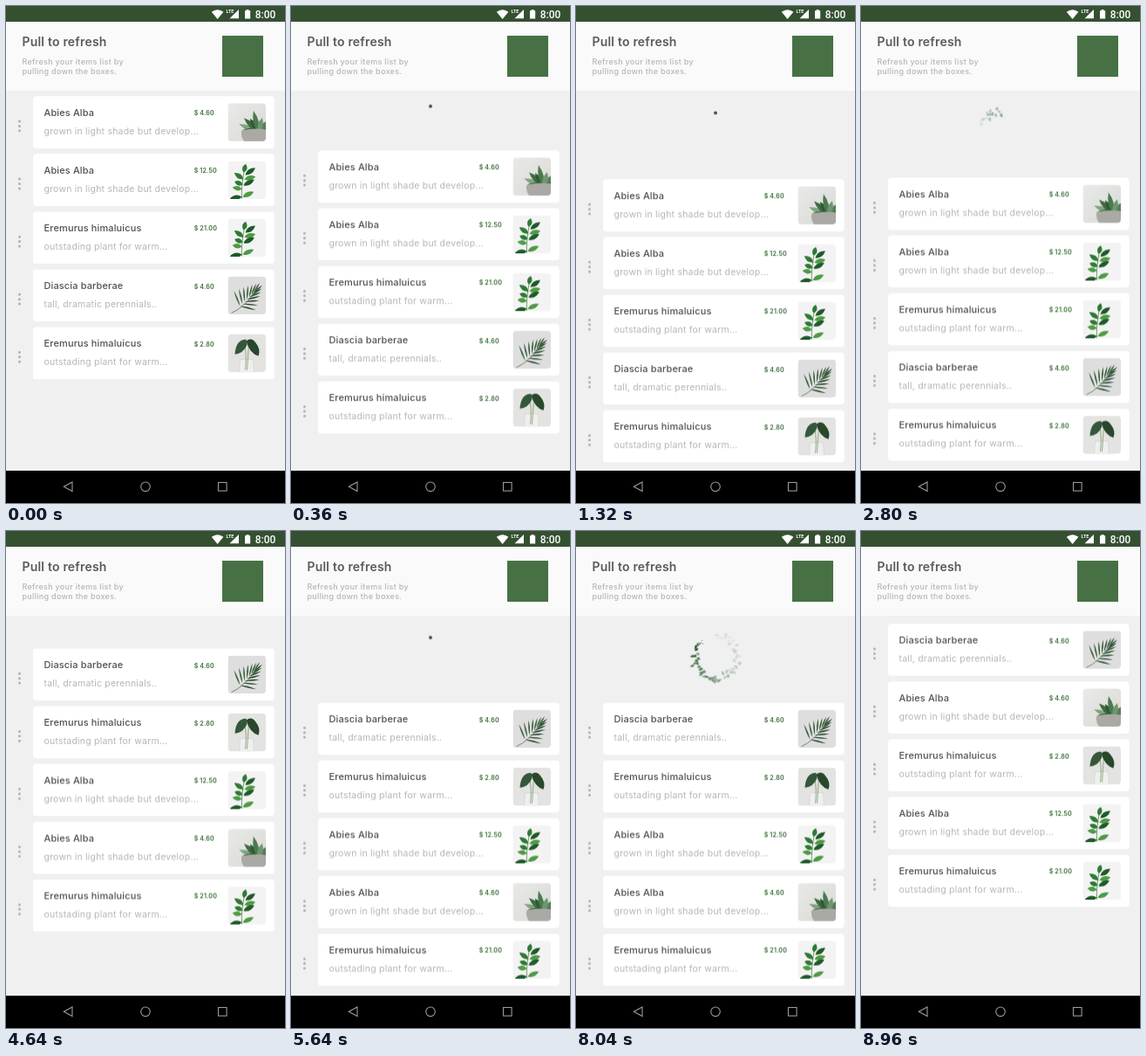
Write an HTML page that moves like this. It is 320 px wide and 569 px high and loops after 9 s.

```html
<!DOCTYPE html>
<html lang="en">
<head>
<meta charset="utf-8">
<title>Pull to refresh</title>
<style>
  html, body { margin: 0; width: 100%; height: 100%; overflow: hidden; background: #f0f0f0; }
  svg { display: block; width: 100vw; height: 100vh; }
  text { font-family: Inter, "Open Sans", sans-serif; }

  .title { font-size: 14px; font-weight: 600; letter-spacing: .2px; fill: #5a5a5a; }
  .sub { font-size: 9px; font-weight: 500; letter-spacing: .3px; fill: #b6b6b6; }
  .name { font-size: 11px; font-weight: 500; letter-spacing: .12px; fill: #505050; }
  .desc { font-size: 10.5px; letter-spacing: .2px; fill: #b4b6b8; }
  .price { font-size: 7px; font-weight: 700; letter-spacing: .15px; fill: #4b7a47; }
  .clock { font: 500 12px Roboto, sans-serif; fill: #fff; }
  .lte { font: 700 5.5px Roboto, sans-serif; fill: #fff; }

  .list { --k: 1; animation: pull 9s infinite; }
  .dot { --k: .23; animation: pull 9s infinite, dot 9s linear infinite; }
  .card { animation: order 9s linear infinite; }
  .leaf { animation: grow 9s linear infinite, fade 9s linear infinite; }

  @keyframes pull {
    0%, 1.78% { transform: translateY(0); animation-timing-function: cubic-bezier(.35, .1, .4, 1); }
    8.44% { transform: translateY(calc(var(--k) * 154px)); animation-timing-function: linear; }
    10.89% { transform: translateY(calc(var(--k) * 156px)); animation-timing-function: cubic-bezier(.25, .46, .45, .94); }
    15.33% { transform: translateY(calc(var(--k) * 93.4px)); }
    48.87% { transform: translateY(calc(var(--k) * 93.4px)); animation-timing-function: cubic-bezier(.455, .03, .515, .955); }
    53.47% { transform: translateY(0); }
    58% { transform: translateY(0); animation-timing-function: ease-in-out; }
    60.22% { transform: translateY(calc(var(--k) * 128px)); animation-timing-function: ease-out; }
    62.44% { transform: translateY(calc(var(--k) * 93.4px)); }
    95.55% { transform: translateY(calc(var(--k) * 93.4px)); animation-timing-function: cubic-bezier(.455, .03, .515, .955); }
    100% { transform: translateY(calc(var(--k) * .9px)); }
  }
  @keyframes dot {
    0%, 2.2% { opacity: 0; }
    3.2%, 16.2% { opacity: 1; }
    16.4%, 58.5% { opacity: 0; }
    59.2%, 63% { opacity: 1; }
    63.1%, 100% { opacity: 0; }
  }
  @keyframes order {
    0%, 48.87% { transform: translateY(var(--a)); }
    48.88%, 95.55% { transform: translateY(var(--b)); }
    95.56%, 100% { transform: translateY(var(--c)); }
  }
  @keyframes grow {
    0% { transform: scale(0); }
    1%, 20% { transform: scale(1); }
    20.1%, 100% { transform: scale(0); }
  }
  @keyframes fade {
    0% { opacity: 1; }
    2.9%, 50% { opacity: 0; }
    50.1%, 100% { opacity: 1; }
  }
</style>
</head>
<body>
<svg viewBox="0 0 320 569" preserveAspectRatio="none">
  <defs>
    <clipPath id="frame"><rect width="43.5" height="43.5" rx="4"/></clipPath>
    <linearGradient id="wall" x2="1" y2="1">
      <stop stop-color="#e9e9e7"/><stop offset="1" stop-color="#d9d9d6"/>
    </linearGradient>
  </defs>
  <rect width="320" height="569" fill="#f0f0f0"/>
  <circle class="dot" cx="160" cy="100.6" r="2" fill="#4b5552"/>
  <g id="loader"></g>
  <g id="list" class="list"></g>

  <rect y="18" width="320" height="79" fill="#fafafa"/>
  <text class="title" x="18.5" y="46">Pull to refresh</text>
  <text class="sub" x="18.5" y="67">Refresh your items list by</text>
  <text class="sub" x="18.5" y="78.3">pulling down the boxes.</text>
  <rect x="248" y="34" width="47" height="47" fill="#477145"/>

  <rect width="320" height="18" fill="#345031"/>
  <g fill="#fff">
    <path d="M242.6 15L235.8 6.8Q242.6 1.8 249.4 6.8Z"/>
    <path d="M267 4V14.3H256.5Z"/>
    <path d="M274 5.2h1.8V4h2.6v1.2h1.8v9.4H274Z"/>
  </g>
  <text class="lte" x="252.5" y="8.4" stroke="#345031" stroke-width="1" paint-order="stroke">LTE</text>
  <text class="clock" x="285.7" y="14">8:00</text>

  <rect y="532" width="320" height="37" fill="#000"/>
  <g fill="none" stroke="#9a9a9a" stroke-width="1.1">
    <path d="M66.3 550.3L76 545V555.6Z"/>
    <circle cx="160" cy="550.3" r="5.3"/>
    <rect x="243.5" y="545.5" width="9.6" height="9.6"/>
  </g>
</svg>
<script>
  const PITCH = 66.1, RUN = 1320, LOOP = 9000;

  let seed = 7;
  const rnd = () => (seed = (seed * 16807) % 2147483647) / 2147483647;
  const pick = list => list[Math.floor(rnd() * list.length)];

  const blade = (x, y, deg, len, w, fill, attrs = "") =>
    `<g transform="translate(${x} ${y}) rotate(${deg})"><path ${attrs} fill="${fill}"
      d="M0 0Q${len * .45} ${-w} ${len} 0Q${len * .45} ${w} 0 0"/></g>`;
  const stroke = (d, color, w) => `<path d="${d}" fill="none" stroke="${color}" stroke-width="${w}"/>`;
  const photo = (fill, body) => `<rect width="44" height="44" fill="${fill}"/>${body}`;

  function succulent() {
    const leaves = [[-158, 24, "#7fa37f"], [-136, 23, "#3f6a42"], [-25, 14, "#3f6b45"], [-48, 18, "#587f5a"],
      [-122, 18, "#2f5a37"], [-103, 25, "#4a7a4e"], [-172, 18, "#35603b"], [-75, 17, "#6d9770"]];
    return photo("url(#wall)",
      leaves.map(([deg, len, c]) => blade(35, 33, deg, len, 6, c)).join("") +
      `<path d="M16 31Q31 28 44 30V44H19Q14 38 16 31Z" fill="#aaa9a5"/>`);
  }

  function bush() {
    const leaves = [[18, 13, -75, 10], [20, 16, -35, 14], [19, 21, -14, 13], [18, 21, -145, 13],
      [18, 28, -28, 14], [16, 32, -172, 11], [17, 27, -160, 10], [16, 41, 172, 14], [17, 41, -24, 14]];
    const greens = ["#2f7a35", "#1f5a2a", "#4f9a45"];
    return photo("#f3f3f3",
      stroke("M16 43Q15 30 19 10", "#4c8a45", .8) +
      leaves.map(([x, y, deg, len], i) => blade(x, y, deg, len, 5.5, greens[i % 3])).join(""));
  }

  function palm() {
    let body = stroke("M4 42Q18 36 32 17", "#4a5f48", .7);
    for (let i = 0; i < 7; i++) {
      const x = 14 + i * 2.6, y = 34 - i * 2.6, len = 19 - i;
      body += blade(x, y, -112 + i * 9, len, 1.8, "#3f6240");
      body += blade(x, y, 14 - i * 9, len, 1.8, "#2f5134");
    }
    return photo("#dedede", body);
  }

  function hearts() {
    return photo("#e3e3e1",
      `<path d="M14 29h15l1 15H13Z" fill="#efefee" stroke="#cfcfcd" stroke-width=".6"/>` +
      stroke("M19 12Q22 24 20 41M24 12Q23 26 22 41", "#7d9a6c", .8) +
      `<path d="M21 6Q9 6 8 23Q18 22 22 12Z" fill="#34573a"/>
       <path d="M21 8Q27 3 32 10Q38 17 35 25Q25 22 21 8Z" fill="#28472b"/>`);
  }

  const light = "grown in light shade but develop...", warm = "outstading plant for warm...";
  // name, text, price, picture, slots before and after each refresh
  const items = [
    ["Abies Alba", light, "4.60", succulent, [0, 3, 1]],
    ["Abies Alba", light, "12.50", bush, [1, 2, 3]],
    ["Eremurus himaluicus", warm, "21.00", bush, [2, 4, 4]],
    ["Diascia barberae", "tall, dramatic perennials..", "4.60", palm, [3, 0, 0]],
    ["Eremurus himaluicus", warm, "2.80", hearts, [4, 1, 2]]
  ];

  const card = ([name, desc, price, picture, slots]) => {
    const vars = slots.map((s, i) => `--${"abc"[i]}:${s * PITCH}px`).join(";");
    const grip = [29, 34.4, 39.8].map(y => `<circle cx="15.5" cy="${103 + y}" r="1.5" fill="#b0b0b0"/>`).join("");
    return `<g class="card" style="${vars}">${grip}
      <rect x="31" y="103.2" width="276.7" height="59.8" rx="4" fill="#fff"/>
      <text class="name" x="43.5" y="125.6">${name}</text>
      <text class="desc" x="43.5" y="146.6">${desc}</text>
      <text class="price" x="215.8" y="125.3">$ ${price}</text>
      <g transform="translate(254.5 111.3)" clip-path="url(#frame)">${picture()}</g></g>`;
  };
  document.getElementById("list").innerHTML = items.map(card).join("");

  // Leaves sprout clockwise from the top of a ring, and wither behind the head.
  const starts = [1450, 1450 + RUN, 5650, 5650 + RUN];
  const greens = ["#3f6f45", "#54825a", "#2f5a38", "#4a7850", "#7fa385"];
  let ring = "";
  for (let i = 0; i < 80; i++) {
    const u = i / 80, angle = u * 2 * Math.PI, r = 24 + (rnd() - .5) * 5;
    const x = (161 + r * Math.sin(angle)).toFixed(1), y = (145 - r * Math.cos(angle)).toFixed(1);
    const deg = Math.round(rnd() * 360), len = 4 + rnd() * 2, fill = pick(greens);
    for (const s of starts) {
      const born = s + 1180 * u - LOOP, gone = s + 830 + 420 * u * u - LOOP;
      ring += blade(x, y, deg, len, 3, fill,
        `class="leaf" style="animation-delay:${born.toFixed()}ms,${gone.toFixed()}ms"`);
    }
  }
  document.getElementById("loader").innerHTML = ring;
</script>
</body>
</html>
```
